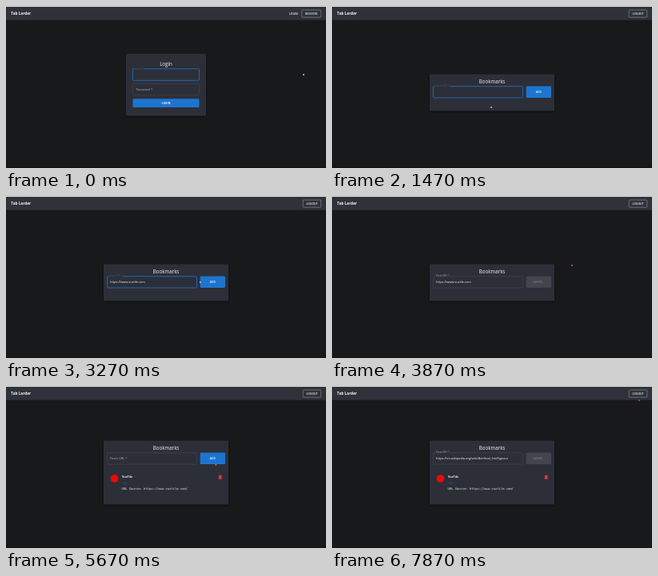
An HTML page for the animation above (8000 ms loop, 400x203 px).

```html
<!DOCTYPE html>
<html lang="en">
<head>
<meta charset="utf-8">
<title>Bookmarks</title>
<style>
  html, body { margin: 0; width: 100%; height: 100%; overflow: hidden; background: #18191b; }
  svg { display: block; width: 100vw; height: 100vh; }
  text { font-family: "Open Sans", "Noto Sans", sans-serif; font-size: 3.9px; fill: #f2f3f5; white-space: pre; }
  .brand { font-size: 4.7px; font-weight: 700; }
  .title { font-size: 6.2px; font-weight: 500; text-anchor: middle; }
  .cap { font-size: 3.4px; font-weight: 600; text-anchor: middle; }
  .label { font-size: 2.9px; fill: #aeb0b6; }
  .hint { fill: #b4b6bb; }
  .mono { font-family: "DejaVu Sans Mono", monospace; font-size: 3.8px; }
  .panel { fill: #2d2f38; filter: drop-shadow(0 1px 1.2px #0008); }
  .box { fill: none; stroke: #484a53; stroke-width: .5; }
  .ghost { fill: none; stroke: #a3a5aa; stroke-width: .5; }
</style>
</head>
<body>
<svg viewBox="0 0 400 203" preserveAspectRatio="none">
  <rect width="400" height="203" fill="#18191b"/>
  <rect width="400" height="17.6" fill="#30323b"/>
  <rect width="400" height="1" fill="#dce2dc"/>
  <rect y="202" width="400" height="1" fill="#220d14"/>
  <text class="brand" x="6.3" y="11.3">Tab Larder</text>

  <g id="guest">
    <text class="cap" x="359.3" y="10.8">LOGIN</text>
    <rect class="ghost" x="369.8" y="5" width="24" height="9.2" rx="1"/>
    <text class="cap" x="381.8" y="10.8">REGISTER</text>
    <rect class="panel" x="150" y="59.8" width="100" height="78" rx="2"/>
    <text class="title" x="200" y="74.7">Login</text>
    <g id="empty">
      <rect class="box" x="158.5" y="78.7" width="83" height="14.6" rx="1.2" style="stroke:#1d74cc;stroke-width:.8"/>
      <rect x="161.3" y="78" width="10.5" height="1.6" fill="#2d2f38"/>
      <text class="label" x="162" y="79.6" style="fill:#3a5878">Email *</text>
      <rect class="box" x="158.5" y="97.4" width="83" height="14.2" rx="1.2"/>
      <text class="hint" x="162.5" y="106">Password *</text>
    </g>
    <g id="filled">
      <rect x="158.2" y="78.6" width="83.6" height="15" rx="1.2" fill="#286898"/>
      <rect x="158.2" y="97.2" width="83.6" height="14.8" rx="1.2" fill="#286898"/>
      <text class="label" x="162" y="79.6">Email *</text>
      <text class="label" x="162" y="98.3">Password *</text>
      <text x="162.5" y="87.4">corvinelasmod42@mail.test</text>
      <text x="162.5" y="106">••••••</text>
    </g>
    <rect id="ring" x="158.2" y="115.5" width="83.6" height="12.3" rx="1.4" fill="#34445f" stroke="#56687f" stroke-width=".5"/>
    <rect id="enter" x="158.5" y="116.2" width="83" height="10.9" rx="1.3" fill="#1d75d0"/>
    <text class="cap" x="200" y="122.9" style="font-weight:700">LOGIN</text>
  </g>

  <g id="member">
    <rect class="ghost" x="371.2" y="5" width="22.6" height="9.2" rx="1"/>
    <text class="cap" x="382.5" y="10.8">LOGOUT</text>
    <g id="sheet">
      <rect id="panel" class="panel" x="122" y="85.5" width="156" height="46" rx="1"/>
      <text class="title" x="200" y="96.8">Bookmarks</text>
      <rect id="field" class="box" x="126.5" y="100.7" width="112" height="14.3" rx="1.2"/>
      <rect id="notch" x="129.2" y="100" width="17" height="1.6" fill="#2d2f38"/>
      <text id="label" class="label" x="130">Paste URL *</text>
      <text id="url" x="130" y="109.1"></text>
      <rect id="caret" y="105.2" width=".5" height="5.2" fill="#f2f3f5"/>
      <rect id="add" x="242.7" y="100.4" width="31.3" height="14.7" rx="1.3"/>
      <text id="addText" class="cap" x="258.3" y="109"></text>
    </g>
    <g id="card">
      <circle cx="135.5" cy="116" r="4.8" fill="#f00808"/>
      <text x="145" y="115.4" style="font-weight:700;font-size:3.7px">VuzTile</text>
      <text class="mono" x="145.6" y="122.8" style="fill:#23608f;font-size:3.3px">URL</text>
      <text class="mono" x="144.6" y="130.3">URL Source: https://www.vuztile.com/</text>
      <path d="M265.6 111.9h1.2l.4-.5h1l.4.5h1.2v.8h-4.2zM265.9 113.1h3.6v3.2q0 .5-.5.5h-2.6q-.5 0-.5-.5z" fill="#e8383b"/>
    </g>
  </g>
  <circle id="mouse" r=".9"/>
</svg>
<script>
const LOOP = 8000;
const LOGGED_IN = 1400, SAVED = 5470, REFOCUS = 6130;
const FIRST = "https://www.vuztile.com";
const SECOND = "https://en.wikipedia.org/wiki/Artificial_Intelligence";
const $ = id => document.getElementById(id);
const set = (id, attrs) => {
  for (const k in attrs) $(id).setAttribute(k, attrs[k]);
};
const show = (id, on) => { $(id).style.display = on ? "" : "none"; };
const within = (t, a, b) => t >= a && t < b;
const part = (t, a, b) => Math.min(1, Math.max(0, (t - a) / (b - a)));
const ease = p => p * p * (3 - 2 * p);

// Pointer stops: time, x, y
const path = [
  [0, 372, 86], [70, 372, 86], [420, 205, 87], [600, 200, 92], [870, 198, 122],
  [1000, 199, 127], [1730, 199, 127], [1950, 196, 108], [3000, 196, 108],
  [3400, 258, 108], [3560, 258, 108], [3870, 300, 87], [4200, 375, 12],
  [4380, 374, 13], [4730, 300, 98], [5340, 300, 98], [5600, 266, 100],
  [5900, 240, 92], [6080, 190, 92], [6180, 190, 92], [6400, 182.5, 157.5],
  [6930, 182.5, 158], [7070, 183, 158], [7370, 257, 92], [7530, 257, 92],
  [7870, 384, 18], [8000, 384, 18]
];

function pointer(t) {
  const i = Math.max(1, path.findIndex(p => p[0] >= t));
  const [a, x, y] = path[i - 1], [b, u, v] = path[i];
  const p = ease(part(t, a, b));
  return [x + (u - x) * p, y + (v - y) * p];
}

function typed(t) {
  if (t < SAVED) {
    const n = t < 2640 ? 15 * part(t, 2030, 2440) : 15 + 8 * part(t, 2640, 2910);
    return FIRST.slice(0, Math.floor(n));
  }
  return t >= 7100 ? SECOND : "";
}

function drawLogin(t) {
  show("empty", t < 530);
  show("filled", t >= 530);
  show("ring", t >= 1000);
  set("enter", { fill: t >= 1000 ? "#2f70b4" : "#1d75d0" });
}

function drawBookmarks(t) {
  const saved = t >= SAVED;
  const saving = within(t, 3520, SAVED) || t >= 7500;
  const focused = !saving && !within(t, SAVED, REFOCUS);
  const raise = saved ? ease(part(t, REFOCUS, REFOCUS + 200)) : 1;
  const value = typed(t);

  set("sheet", { transform: `translate(0 ${saved ? -17 : 0})` });
  set("panel", { height: saved ? 80 : 46 });
  show("card", saved);

  $("field").style.stroke = focused ? "#1d74cc" : "#484a53";
  $("field").style.strokeWidth = focused ? .8 : .5;
  show("notch", raise > .5);
  set("label", { y: 109.1 - 7.7 * raise });
  $("label").style.fontSize = 3.9 - raise + "px";
  $("label").style.fill = focused ? "#3a5878" : "#aeb0b6";

  $("url").textContent = value;
  const blink = saved
    ? within(t, REFOCUS, 6530) || within(t, 7060, 7500)
    : within(t, 2030, 3100);
  show("caret", focused && blink);
  set("caret", { x: 130.2 + (value ? $("url").getComputedTextLength() : 0) });

  set("add", { fill: saving ? "#43454d" : "#1d75d0" });
  $("addText").textContent = saving ? "SAVING..." : "ADD";
  $("addText").style.fill = saving ? "#75777e" : "#f2f3f5";
}

function drawPointer(t) {
  const [cx, cy] = pointer(t);
  const fill = t < 3600 ? "#d8d8da" : t < 4500 ? "#e0606a" : t < 7070 ? "#d98a4a" : "#e0505a";
  set("mouse", { cx, cy, fill });
  show("mouse", !within(t, 2030, 3060));
}

function draw(t) {
  const member = t >= LOGGED_IN;
  show("guest", !member);
  show("member", member);
  if (member) drawBookmarks(t);
  else drawLogin(t);
  drawPointer(t);
}

const start = performance.now();
function tick() {
  draw((performance.now() - start) % LOOP);
  requestAnimationFrame(tick);
}
tick();
</script>
</body>
</html>
```
